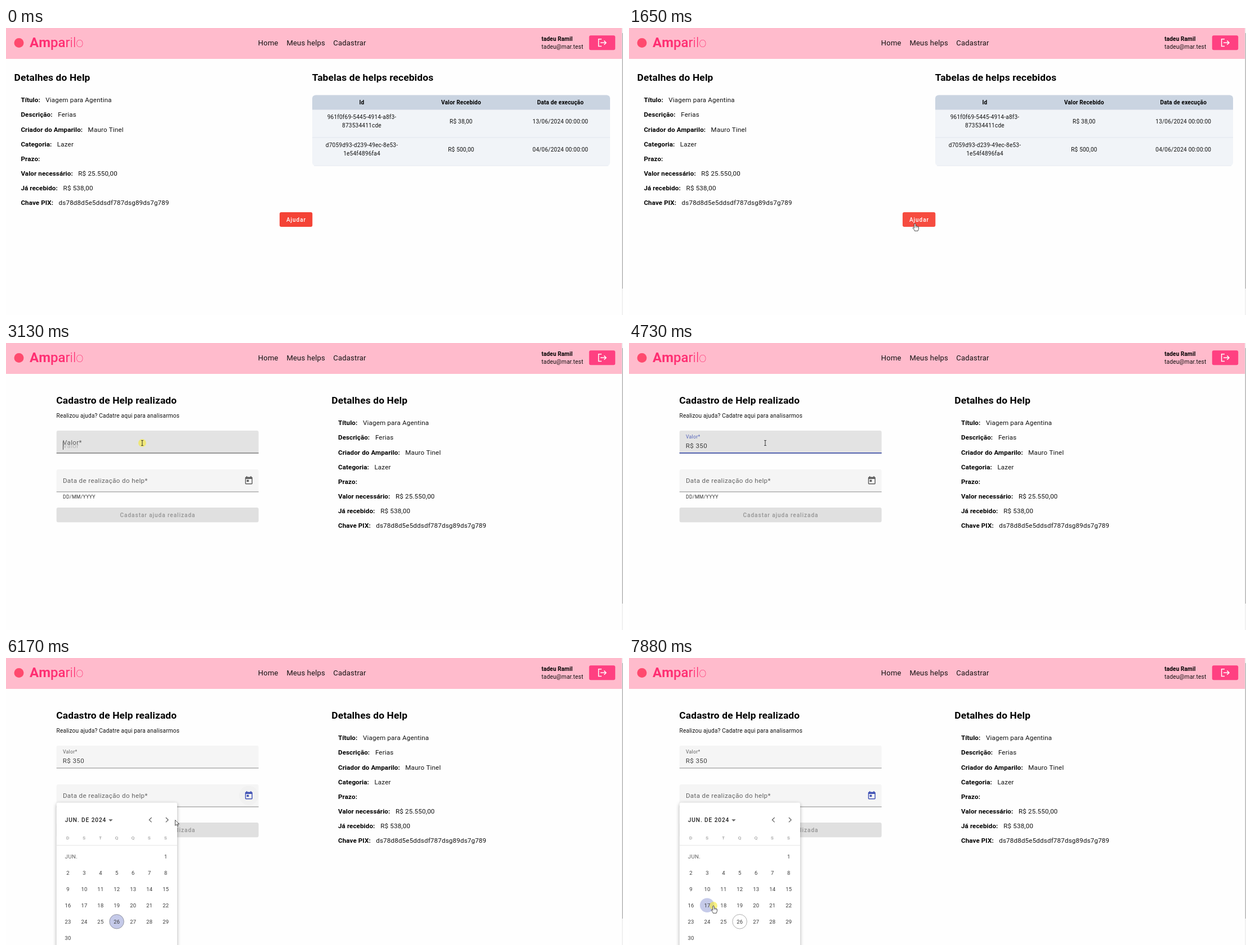
Animation of 1096 by 511 pixels, one loop 8000 ms. Source, as an HTML page with a canvas:

```html
<!DOCTYPE html>
<html lang="pt">
<head>
<meta charset="utf-8">
<title>Detalhes do Help</title>
<style>
html, body { margin: 0; width: 100%; height: 100%; overflow: hidden; background: #fefefe; }
canvas { display: block; width: 1096px; height: 511px; }
</style>
</head>
<body>
<canvas id="stage" width="1096" height="511"></canvas>
<script>
const ctx = document.getElementById('stage').getContext('2d');
const LOOP = 8000;
const INDIGO = '#3f51b5';
const LAVENDER = '#c5cae9';
const T = { press: 2050, form: 2190, focus: 3130, dateClick: 5830, open: 5990, pick: 7880 };

// time, x, y of the pointer's hot spot
const POINTER = [
  [80, 924, 463], [830, 517, 360], [1250, 514, 352], [1650, 508, 348],
  [2590, 508, 348], [2980, 242, 178], [4730, 242, 178], [5490, 424, 250],
  [5620, 424, 250], [5760, 431, 246], [5960, 431, 246], [6380, 170, 331],
  [6930, 169.5, 420.3], [7200, 168, 464], [7800, 150, 441], [8000, 150, 441]
];
const CLICKS = [[T.press, 2260], [T.focus, 3340], [T.dateClick, 5970], [T.pick, LOOP]];
const TYPING = [[3940, 'R$ 3'], [4070, 'R$ 35'], [4200, 'R$ 350']];

const FIELD1 = [89.7, 156, 359, 40.5];
const FIELD2 = [89.7, 224.9, 359, 40.5];
const HELP_BUTTON = [486, 328, 58.3, 26.1];
const DATE_ICON = { x: 431.3, y: 244.8 };
const POPUP = [89.7, 257.5, 214.3, 290];
const GRID = { x: 109.8, y: 353, dx: 28.95, dy: 29 };

const TODAY_ICON = new Path2D('M19 3h-1V1h-2v2H8V1H6v2H5c-1.1 0-2 .9-2 2v14c0 1.1.9 2 2 2h14c1.1 0 2-.9 2-2V5c0-1.1-.9-2-2-2zm0 16H5V8h14v11zM7 10h5v5H7z');
const HAND = new Path2D('M-1.2 1Q0-.9 1.2 1V4.6Q2.3 3.9 3 5Q4.2 4.4 4.8 5.5Q6.4 5.1 6.5 6.8V9.6L5.2 13.3H-.6L-1.4 11.2L-3.9 8.2Q-3.6 6.7-2.4 7.3L-1.2 8.4Z');
const ARROW = new Path2D('M0 0V9.8L2.3 7.7L3.8 11L5.3 10.3L3.9 7.1H7Z');

const clamp = v => Math.max(0, Math.min(1, v));
const progress = (t, start, length) => clamp((t - start) / length);
const mix = (a, b, k) => a + (b - a) * k;
const ease = k => k * k * (3 - 2 * k);
const black = alpha => `rgba(0,0,0,${alpha})`;
const inside = (p, [x, y, w, h]) => p && p.x >= x && p.x <= x + w && p.y >= y && p.y <= y + h;

function text(str, x, y, size, { weight = 400, color = '#111', ls = .18, align = 'left' } = {}) {
  ctx.font = `${weight} ${size}px Roboto, sans-serif`;
  ctx.letterSpacing = ls + 'px';
  ctx.textAlign = align;
  ctx.fillStyle = color;
  ctx.fillText(str, x, y + size * .355);
  return ctx.measureText(str).width;
}

function box(x, y, w, h, color, radius = 0) {
  ctx.fillStyle = color;
  ctx.beginPath();
  ctx.roundRect(x, y, w, h, radius);
  ctx.fill();
}

function disc(x, y, r, fill, stroke) {
  ctx.beginPath();
  ctx.arc(x, y, r, 0, Math.PI * 2);
  if (fill) { ctx.fillStyle = fill; ctx.fill(); }
  if (stroke) { ctx.strokeStyle = stroke; ctx.lineWidth = .8; ctx.stroke(); }
}

function line(points, color, width) {
  ctx.beginPath();
  points.forEach(([x, y]) => ctx.lineTo(x, y));
  ctx.strokeStyle = color;
  ctx.lineWidth = width;
  ctx.stroke();
}

function pointerAt(t) {
  if (t < POINTER[0][0]) return null;
  const i = POINTER.findIndex(key => key[0] > t);
  const [t0, x0, y0] = POINTER[i - 1];
  const [t1, x1, y1] = POINTER[i];
  const k = ease((t - t0) / (t1 - t0));
  return { x: mix(x0, x1, k), y: mix(y0, y1, k) };
}

function drawHeader() {
  box(0, 0, 1094, 55, '#ffbbcc');
  disc(23, 26.5, 8.5, '#ff4a6e');
  let x = 42;
  const weights = [700, 700, 500, 500, 400, 300, 300, 100];
  [...'Amparilo'].forEach((letter, i) => {
    x += text(letter, x, 25, 24, { weight: weights[i], color: '#ff2e72', ls: 0 });
  });
  text('Home', 447.8, 26, 13.05);
  text('Meus helps', 498.4, 26, 13.05);
  text('Cadastrar', 581.3, 26, 13.05);
  text('tadeu Ramil', 951.2, 19, 10.15, { weight: 700, color: '#000', ls: .1 });
  text('tadeu@mar.test', 951.2, 33.5, 10.15);
  box(1035.8, 13.2, 46.4, 26.1, '#ff4081', 3);
  line([[1058, 19.8], [1052.6, 19.8], [1052.6, 32.6], [1058, 32.6]], '#fff', 1.5);
  line([[1056, 26.2], [1065.5, 26.2]], '#fff', 1.5);
  line([[1062.4, 22.6], [1066, 26.2], [1062.4, 29.8]], '#fff', 1.5);
  box(1094, 0, 2, 511, '#f1f1f1');
  box(1094.6, 9, 1.4, 455, '#b4b4b4');
}

function heading(str, x, y) {
  text(str, x, y, 17.4, { weight: 700, color: '#000', ls: .12 });
}

function drawDetails(dx, dy) {
  heading('Detalhes do Help', 14.6 + dx, 87.5 + dy);
  const rows = [
    ['Título:', 'Viagem para Agentina', 70.3],
    ['Descrição:', 'Ferias', 92.3],
    ['Criador do Amparilo:', 'Mauro Tinel', 145.6],
    ['Categoria:', 'Lazer', 90.8],
    ['Prazo:', '', 0],
    ['Valor necessário:', 'R$ 25.550,00', 128.3],
    ['Já recebido:', 'R$ 538,00', 101.6],
    ['Chave PIX:', 'ds78d8d5e5ddsdf787dsg89ds7g789', 93.6]
  ];
  rows.forEach(([label, value, x], i) => {
    const y = 128.3 + dy + i * 26.05;
    text(label, 26.4 + dx, y, 11.6, { weight: 700, color: '#000', ls: .1 });
    text(value, x + dx, y, 11.6);
  });
}

function drawTable() {
  heading('Tabelas de helps recebidos', 543.7, 87.5);
  box(544, 119.5, 529, 126, '#f1f4f8', 6);
  box(544, 119.5, 529, 26, '#cad4e1', [6, 6, 0, 0]);
  box(544, 194.6, 529, .8, '#e2e8f0');
  box(547, 244.7, 523, .8, '#e2e8f0');
  const columns = [632, 808.4, 984.7];
  const cell = (str, col, y, style) => text(str, columns[col], y, 10.15, { align: 'center', ...style });
  ['Id', 'Valor Recebido', 'Data de execução'].forEach((name, i) =>
    cell(name, i, 132.7, { weight: 700, color: '#000', ls: .13 }));
  const rows = [
    ['961f0f69-5445-4914-a8f3-', '873534411cde', 'R$ 38,00', '13/06/2024 00:00:00'],
    ['d7059d93-d239-49ec-8e53-', '1e54f4896fa4', 'R$ 500,00', '04/06/2024 00:00:00']
  ];
  rows.forEach(([id1, id2, value, date], i) => {
    const y = 166 + i * 50;
    cell(id1, 0, y - 7.3);
    cell(id2, 0, y + 7);
    cell(value, 1, y);
    cell(date, 2, y);
  });
}

function drawListPage(pointer) {
  drawDetails(0, 0);
  drawTable();
  box(...HELP_BUTTON, inside(pointer, HELP_BUTTON) ? '#f64c40' : '#f44336', 3);
  text('Ajudar', 515.5, 341.2, 10.15, { weight: 500, color: '#fff', ls: .9, align: 'center' });
}

function drawField([x, y, w, h], fill, lineAlpha) {
  box(x, y, w, h, fill, [3, 3, 0, 0]);
  box(x, y + h - .9, w, .9, black(lineAlpha));
}

function drawValueField(t, hovered) {
  const [x, y, w, h] = FIELD1;
  const focused = t >= T.focus && t < T.open;
  const fill = hovered ? (focused ? '#e3e3e3' : '#ebebeb') : '#f5f5f5';
  drawField(FIELD1, fill, hovered ? .7 : .45);
  if (focused) {
    const spread = w * progress(t, T.focus, 150);
    box(x + (w - spread) / 2, y + h - 1.45, spread, 1.45, INDIGO);
  }
  const lift = ease(progress(t, T.focus, 150));
  text('Valor*', 101, mix(176.5, 167.3, lift), mix(11.6, 8.7, lift), {
    color: focused && lift > .4 ? 'rgba(63,81,181,.87)' : black(.6), ls: mix(.36, .27, lift)
  });
  const typed = TYPING.filter(([time]) => t >= time).pop();
  let caretX = 101.5;
  if (typed) {
    caretX = 101 + text(typed[1], 100.8, 182.7, 11.6, { color: black(.74), ls: .36 });
  } else if (t >= T.focus) {
    const alpha = mix(.2, .4, progress(t, T.focus, 140));
    text('Valor', 101, 182.7, 11.6, { color: black(alpha), ls: .36 });
  }
  const caretOn = (t >= T.focus && t < 3680) || (t >= 3940 && t < 4730);
  if (caretOn) box(caretX - .4, 175, .9, 15, '#333');
}

function drawDateField(t, pointer) {
  const open = t >= T.open;
  const hovered = !open && inside(pointer, FIELD2);
  drawField(FIELD2, hovered ? '#ebebeb' : '#f5f5f5', hovered ? .75 : .45);
  text('Data de realização do help*', 100.9, 245.3, 11.6, { color: black(.6), ls: .36 });
  text('DD/MM/YYYY', 101.1, 273.9, 8.7, { color: black(.8), ls: .29 });

  const near = hovered && Math.hypot(pointer.x - DATE_ICON.x, pointer.y - DATE_ICON.y) < 17.4;
  const pressed = t >= T.dateClick ? .145 * (1 - progress(t, T.open, 200)) : 0;
  const shade = pressed || (near ? .05 : 0);
  if (shade) disc(DATE_ICON.x, DATE_ICON.y, 17.4, black(shade));
  ctx.save();
  ctx.translate(DATE_ICON.x - 8.7, DATE_ICON.y - 8.5);
  ctx.scale(.725, .725);
  ctx.fillStyle = open ? INDIGO : '#5e5e5e';
  ctx.fill(TODAY_ICON);
  ctx.restore();
}

function dayAt(p) {
  const col = Math.round((p.x - GRID.x) / GRID.dx);
  const row = Math.round((p.y - GRID.y) / GRID.dy);
  const day = row * 7 + col - 5;
  return col >= 0 && col < 7 && day >= 1 && day <= 30 ? day : 0;
}

function drawCalendar(t, pointer) {
  const k = ease(progress(t, T.open, 120));
  ctx.save();
  ctx.globalAlpha = k;
  ctx.translate(0, POPUP[1]);
  ctx.scale(1, mix(.8, 1, k));
  ctx.translate(0, -POPUP[1]);

  ctx.save();
  ctx.shadowColor = black(.32);
  ctx.shadowBlur = 6;
  ctx.shadowOffsetY = 2;
  box(...POPUP, '#fff', 3);
  ctx.restore();

  text('JUN. DE 2024', 104.8, 288.4, 10.15, { weight: 500, color: '#222', ls: .9 });
  ctx.fillStyle = '#666';
  ctx.fill(new Path2D('M182.2 287.2H189.6L185.9 290.9Z'));
  line([[258.6, 284], [254.4, 288.2], [258.6, 292.4]], '#666', 1.3);
  line([[283.9, 284], [288.1, 288.2], [283.9, 292.4]], '#666', 1.3);
  [...'DSTQQSS'].forEach((letter, i) =>
    text(letter, GRID.x + i * GRID.dx, 320.3, 8, { color: '#858585', align: 'center' }));
  box(POPUP[0], 333, POPUP[2], .8, '#dedede');
  text('JUN.', 104.8, 353.2, 9.7, { color: '#606060', ls: .3 });

  const hover = dayAt(pointer);
  for (let day = 1; day <= 30; day++) {
    const cell = day + 5;
    const x = GRID.x + (cell % 7) * GRID.dx;
    const y = GRID.y + Math.floor(cell / 7) * GRID.dy;
    const today = day === 26;
    const filled = day === hover || (today && t < T.pick);
    if (filled || today) disc(x, y + .3, 12.8, filled && LAVENDER, today && black(.4));
    text(String(day), x + .2, y + .2, 9.5, { color: '#3c3c3c', ls: .2, align: 'center' });
  }
  ctx.restore();
}

function drawFormPage(t, pointer) {
  heading('Cadastro de Help realizado', 89.3, 101.5);
  text('Realizou ajuda? Cadatre aqui para analisarmos', 89.5, 129.2, 10.15);
  drawDetails(563.6, 14);
  drawValueField(t, inside(pointer, FIELD1));
  drawDateField(t, pointer);
  box(89.7, 293.1, 359, 26.1, '#e0e0e0', 3);
  text('Cadastar ajuda realizada', 269.5, 306.5, 10.15, { weight: 500, color: '#949494', ls: .9, align: 'center' });
  if (t >= T.open) drawCalendar(t, pointer);
}

function pointerKind(t, p) {
  if (t < T.form) return inside(p, HELP_BUTTON) ? 'hand' : 'arrow';
  if (t >= T.open) return inside(p, POPUP) && dayAt(p) ? 'hand' : 'arrow';
  if (inside(p, FIELD2) && p.x > DATE_ICON.x - 17) return 'hand';
  return inside(p, FIELD1) || inside(p, FIELD2) ? 'beam' : 'arrow';
}

function drawPointer(t, p) {
  if (CLICKS.some(([from, to]) => t >= from && t < to)) disc(p.x, p.y, 7, 'rgba(247,233,50,.6)');
  const kind = pointerKind(t, p);
  ctx.save();
  ctx.translate(p.x, p.y);
  if (kind === 'beam') {
    line([[0, -4.5], [0, 4.5]], '#222', .9);
    line([[-2, -4.5], [2, -4.5]], '#222', .8);
    line([[-2, 4.5], [2, 4.5]], '#222', .8);
  } else {
    const shape = kind === 'hand' ? HAND : ARROW;
    ctx.fillStyle = '#fff';
    ctx.fill(shape);
    ctx.strokeStyle = '#222';
    ctx.lineWidth = .8;
    ctx.stroke(shape);
    if (kind === 'hand') {
      line([[1.4, 4.8], [1.4, 7.5]], '#444', .6);
      line([[3.1, 5.3], [3.1, 7.5]], '#444', .6);
      line([[4.8, 5.8], [4.8, 7.6]], '#444', .6);
    }
  }
  ctx.restore();
}

function draw(now) {
  const t = now % LOOP;
  const pointer = pointerAt(t);
  box(0, 0, 1096, 511, '#fefefe');
  drawHeader();
  if (t < T.form) drawListPage(pointer);
  else drawFormPage(t, pointer);
  if (pointer) drawPointer(t, pointer);
}

let start;
function tick(now) {
  start ??= now;
  draw(now - start);
  requestAnimationFrame(tick);
}
draw(0);
requestAnimationFrame(tick);
</script>
</body>
</html>
```
